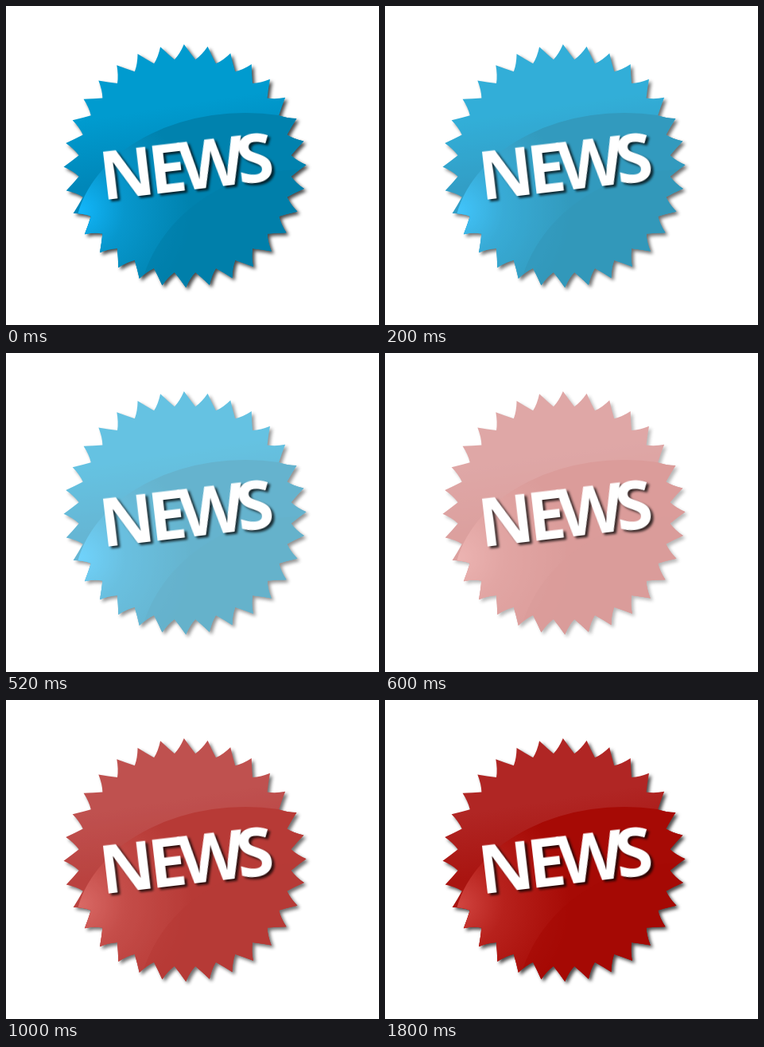
An HTML page that plays this animation: 469 px wide and 400 px high, repeating every 2200 ms.

```html
<!DOCTYPE html>
<html lang="en">
<head>
<meta charset="utf-8">
<title>News badge</title>
<style>
  html, body { margin: 0; width: 100%; height: 100%; overflow: hidden; background: #fff; }
  svg { display: block; width: 469px; height: 400px; }
  svg {
    --top: #009bcf; --mid: #0087b9; --low: #0082ae; --deep: #007ea9; --glow: #12b6fa;
  }
  svg.red {
    --top: #b02624; --mid: #a91410; --low: #a60a05; --deep: #a50904; --glow: #d0443f;
  }
  #badge { filter: drop-shadow(3px 3px 2px rgba(0, 0, 0, .7)); }
  text {
    font: 700 84px "Open Sans", "Noto Sans", sans-serif;
    fill: #fff;
    filter: drop-shadow(3px 3px 1.5px rgba(0, 0, 0, .75));
  }
</style>
</head>
<body>
<svg viewBox="0 0 469 400">
  <defs>
    <clipPath id="clip"><path id="star"/></clipPath>
    <linearGradient id="upper" gradientUnits="userSpaceOnUse" x1="215" y1="110" x2="230" y2="205">
      <stop offset=".15" stop-color="var(--top)"/>
      <stop offset="1" stop-color="var(--mid)"/>
    </linearGradient>
    <radialGradient id="shine" gradientUnits="userSpaceOnUse" cx="93" cy="256" r="140">
      <stop offset="0" stop-color="var(--glow)"/>
      <stop offset=".4" stop-color="var(--glow)" stop-opacity=".4"/>
      <stop offset="1" stop-color="var(--glow)" stop-opacity="0"/>
    </radialGradient>
  </defs>
  <g id="badge">
    <g clip-path="url(#clip)">
      <rect width="469" height="400" fill="url(#upper)"/>
      <ellipse cx="301" cy="292" rx="215" ry="158" fill="var(--low)"/>
      <ellipse cx="301" cy="292" rx="215" ry="158" fill="url(#shine)"/>
      <ellipse cx="370" cy="390" rx="205" ry="185" fill="var(--deep)" opacity=".6"/>
    </g>
  </g>
  <text transform="translate(130 242.5) rotate(-6.7)" x="-8.5 53.5 92.5 164.5">NEWS</text>
</svg>
<script>
  const TEETH = 32, CX = 225, CY = 200.5, TIP = 152.5, VALLEY = 134;
  const TURN = -.04;
  const STEP = 200, LOOP = 2200;
  const OPACITY = [1, .8, .6, .4, .6, .8, 1];
  const svg = document.querySelector('svg');
  const badge = document.getElementById('badge');

  // Position on a circle, measured in teeth clockwise from the top.
  function polar(r, tooth) {
    const a = (tooth + TURN) * 2 * Math.PI / TEETH;
    return `${(CX + r * Math.sin(a)).toFixed(2)} ${(CY - r * Math.cos(a)).toFixed(2)}`;
  }

  // Each tooth leans slightly: a fuller trailing side and a hollow leading side.
  let path = 'M' + polar(TIP, 0);
  for (let i = 0; i < TEETH; i++) {
    path += `Q${polar(142.5, i + .25)} ${polar(VALLEY, i + .54)}`;
    path += `Q${polar(141, i + .82)} ${polar(TIP, i + 1)}`;
  }
  document.getElementById('star').setAttribute('d', path + 'Z');

  function draw() {
    const step = Math.min(Math.floor(performance.now() % LOOP / STEP), OPACITY.length - 1);
    svg.classList.toggle('red', step > 2);
    badge.style.opacity = OPACITY[step];
    requestAnimationFrame(draw);
  }
  draw();
</script>
</body>
</html>
```
